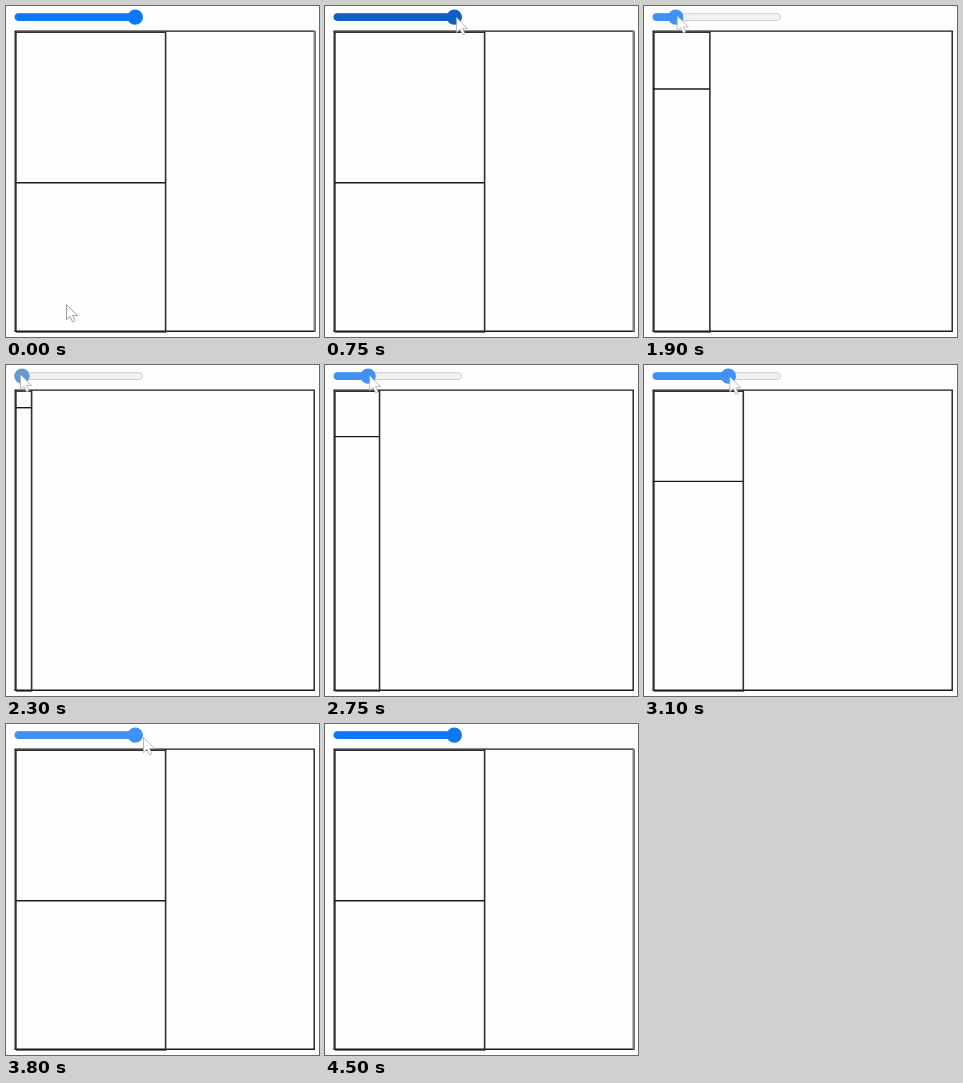
An HTML page with a canvas that plays this animation: 313 by 331 pixels, repeating every 4.75 s.

```html
<!DOCTYPE html>
<html lang="en">
<head>
<meta charset="utf-8">
<title>Slider and split box</title>
<style>
  html, body { margin: 0; width: 100%; height: 100%; overflow: hidden; background: #fefefe; }
  canvas { display: block; }
</style>
</head>
<body>
<canvas id="stage" width="313" height="331"></canvas>
<script>
const ctx = document.getElementById('stage').getContext('2d');
const LOOP = 4750, STEP = 50;
const HOVER = 350, PRESS = 1100, TURN = 2300, DRAG_END = 3450, RELEASE = 4500;
const MIN_SIZE = 16, MAX_SIZE = 150;
const INK = '#1a1a1a', GREY = '#777';

const lerp = (a, b, u) => a + (b - a) * u;
const progress = (t, start, end) => Math.min(1, Math.max(0, (t - start) / (end - start)));
const smooth = u => u * u * (3 - 2 * u);

// The pointer enters, drags the thumb left, then back to the right.
function pointerAt(t) {
  if (t < PRESS) {
    const u = smooth(progress(t, 0, HOVER));
    return [lerp(60, 131, u), lerp(298, 11, u)];
  }
  if (t < TURN) {
    const u = Math.pow(1 - progress(t, PRESS, TURN), 5 / 3);
    return [lerp(14, 131, u), lerp(9, 11, u)];
  }
  const u = Math.pow(progress(t, TURN, DRAG_END), 1.5);
  return [lerp(14, 137, u), lerp(9, 13, u)];
}

// The square trails behind the thumb.
function sizeAt(t) {
  const u = t < TURN ? 1 - progress(t, 1200, TURN) : progress(t, TURN, 3800);
  return lerp(MIN_SIZE, MAX_SIZE, smooth(u));
}

function line(x1, y1, x2, y2, color = INK, width = 1.4) {
  ctx.strokeStyle = color;
  ctx.lineWidth = width;
  ctx.beginPath();
  ctx.moveTo(x1, y1);
  ctx.lineTo(x2, y2);
  ctx.stroke();
}

function pill(x, y, w, h) {
  ctx.beginPath();
  ctx.roundRect(x, y, w, h, h / 2);
}

function drawSlider(x, color) {
  pill(9, 7.7, 127.5, 6.8);
  ctx.fillStyle = '#f1f1f1';
  ctx.fill();
  ctx.strokeStyle = '#c4c4c4';
  ctx.lineWidth = 0.8;
  ctx.stroke();
  ctx.fillStyle = color;
  pill(8.6, 7.3, x - 8.6, 7.6);
  ctx.fill();
  ctx.beginPath();
  ctx.arc(x, 11.1, 7.7, 0, 2 * Math.PI);
  ctx.fill();
}

function drawBoxes(size, pressed) {
  const x = 9.6 + size, y = 26.7 + size;
  if (!pressed) line(309.5, 25, 309.5, 326, GREY, 1);
  line(10, 326.5, x + 0.5, 326.5, GREY, 1);
  line(8.5, 25.1, 308.8, 25.1);
  line(8.5, 325.2, 308.8, 325.2);
  line(308.2, 25, 308.2, 325.5, pressed ? INK : GREY);
  line(9.6, 25, 9.6, 326, '#303030', 2.2);
  line(9, 26.3, x, 26.3, '#303030', 1.2);
  line(x, 25, x, 326.5, '#303030', 1.6);
  line(9, y, x, y);
}

function drawPointer(x, y, overSlider) {
  const arrow = [[0, 0], [0, 15], [3.5, 11.8], [6, 17.3], [8.4, 16.2], [6, 11], [11, 11]];
  ctx.beginPath();
  for (const [dx, dy] of arrow) ctx.lineTo(x + dx + 0.5, y + dy + 0.5);
  ctx.closePath();
  ctx.fillStyle = '#fff';
  ctx.fill();
  ctx.strokeStyle = overSlider ? '#aaa' : '#888';
  ctx.lineWidth = 0.8;
  ctx.stroke();
}

function draw(t) {
  const pressed = t >= PRESS && t < RELEASE;
  const hovered = t >= HOVER && t < PRESS;
  const [px, py] = pointerAt(t);
  const thumb = pressed ? Math.min(129.3, Math.max(16, px - 1)) : 129.3;
  const active = thumb < 20 ? '#6199d6' : '#3f92f5';
  ctx.fillStyle = '#fefefe';
  ctx.fillRect(0, 0, 313, 331);
  drawSlider(thumb, pressed ? active : hovered ? '#0c60c6' : '#0c78f8');
  drawBoxes(sizeAt(t), pressed);
  if (t < RELEASE) drawPointer(px, py, hovered || pressed);
}

function tick() {
  const t = performance.now() % LOOP;
  draw(Math.floor(t / STEP) * STEP);
  requestAnimationFrame(tick);
}
tick();
</script>
</body>
</html>
```
